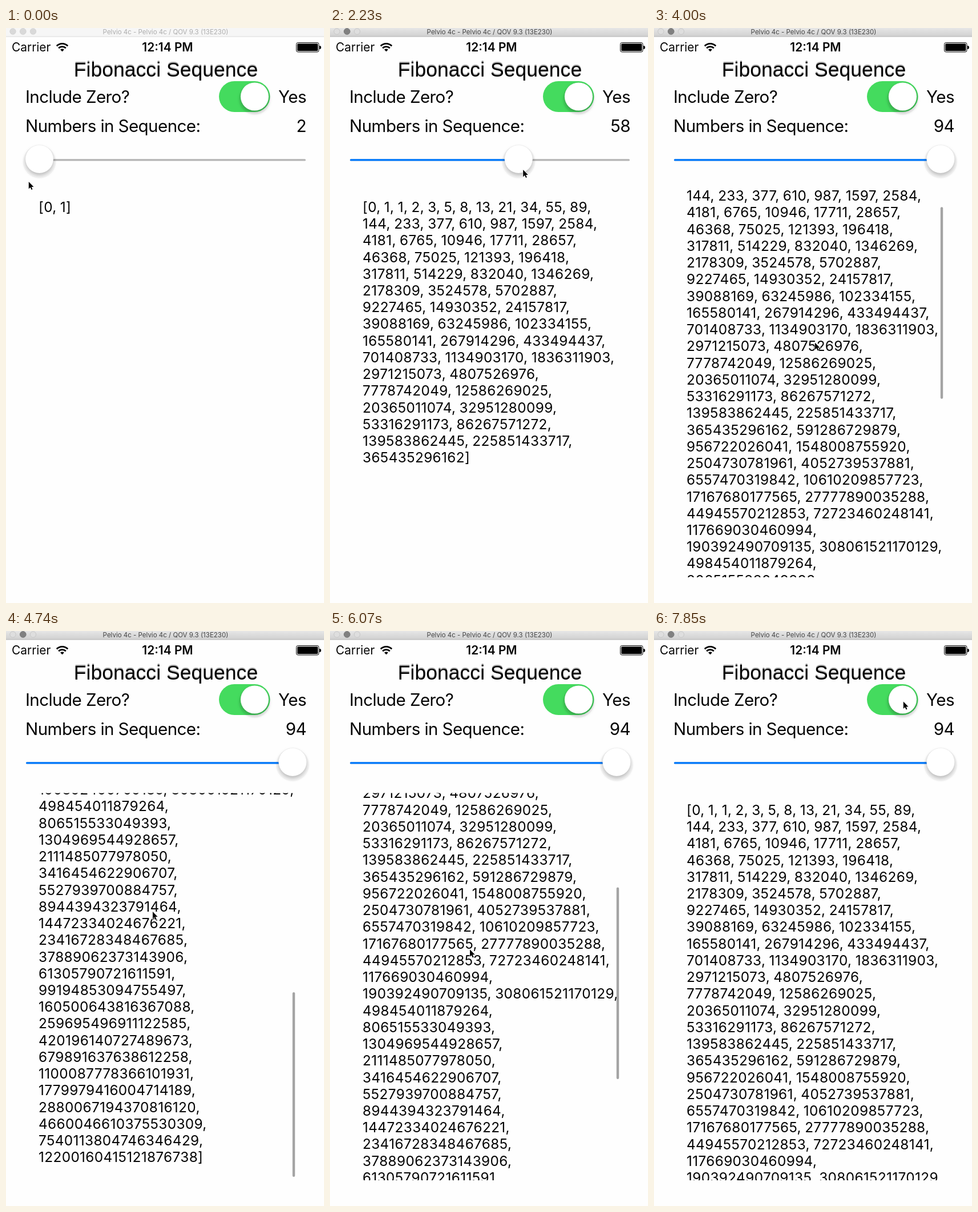
Write an HTML page that moves like this. It is 557 px wide and 1006 px high and loops after 7990 ms.

```html
<!DOCTYPE html>
<html lang="en">
<head>
<meta charset="utf-8">
<title>Fibonacci Sequence</title>
<style>
  html, body { margin: 0; width: 100%; height: 100%; overflow: hidden; background: #fefefe; }
  svg { display: block; width: 100vw; height: 100vh; font-family: Inter, "Open Sans", sans-serif; }
  text { fill: #050505; white-space: pre; }
  .label text { font-size: 29.6px; letter-spacing: -.6px; }
  .title { font: 35.6px "Liberation Sans", Arial, sans-serif; }
  #lines text { font-size: 24.4px; letter-spacing: .33px; word-spacing: -1px; }
  .knob { fill: #fff; stroke: rgba(0,0,0,.07); stroke-width: .8; filter: drop-shadow(0 4px 3px rgba(0,0,0,.22)); }
  .halo { fill: rgba(0,0,0,.035); }
</style>
</head>
<body>
<svg viewBox="0 0 557 1006" preserveAspectRatio="none">
  <defs>
    <linearGradient id="chrome" x2="0" y2="1">
      <stop stop-color="#e6e6e6"/><stop offset="1" stop-color="#d0d0d0"/>
    </linearGradient>
    <clipPath id="view"><rect x="40" y="283.5" width="480" height="677.5"/></clipPath>
  </defs>
  <rect width="557" height="1006" fill="#fefefe"/>

  <rect id="bar" width="557" height="15"/>
  <rect id="barEdge" y="14.5" width="557" height="1"/>
  <g id="buttons" stroke-width=".8">
    <circle cx="12" cy="6" r="5.2"/><circle cx="29.8" cy="6" r="5.4"/><circle cx="47.5" cy="6" r="5.2"/>
  </g>
  <text id="barText" x="279.5" y="10.5" font-size="11.5" text-anchor="middle">Pelvio 4c - Pelvio 4c / QOV 9.3 (13E230)</text>

  <g font-size="20.9">
    <text x="10" y="41">Carrier</text>
    <text x="283" y="41" font-weight="600" text-anchor="middle">12:14 PM</text>
  </g>
  <g fill="none" stroke="#050505" stroke-width="2.9">
    <path d="M88.8 31.4a13.6 13.6 0 0 1 19.4 0M92.2 35.3a8.8 8.8 0 0 1 12.6 0"/>
    <path d="M98.5 41.3l-3.4-3.5a4.8 4.8 0 0 1 6.8 0z" fill="#050505" stroke="none"/>
  </g>
  <rect x="508.5" y="25.5" width="39.5" height="16.5" rx="3" fill="none" stroke="#050505"/>
  <rect x="510.2" y="27.2" width="36.1" height="13.1" rx="1.5"/>
  <path d="M549 31a3 3 0 0 1 0 6z"/>

  <text class="title" x="280" y="83.3" text-anchor="middle" style="fill:#aaa">Fibonacci Sequence</text>
  <text class="title" x="280" y="85" text-anchor="middle">Fibonacci Sequence</text>

  <g class="label">
    <text x="34" y="130.5">Include Zero?</text>
    <text x="526" y="130.5" text-anchor="end">Yes</text>
    <text x="34" y="181.5">Numbers in Sequence:</text>
    <text id="count" x="526" y="181.5" text-anchor="end"></text>
  </g>

  <rect x="373" y="93" width="89.5" height="54" rx="27" fill="#44db5e"/>
  <circle class="halo" cx="435.5" cy="124" r="28"/>
  <circle class="knob" cx="435.5" cy="120" r="24.6"/>

  <rect x="35" y="229.2" width="490" height="3.4" rx="1.7" fill="#b4b4b4"/>
  <rect id="fill" x="35" y="229.2" height="3.4" rx="1.7" fill="#007aff"/>
  <g id="thumb">
    <circle class="halo" cy="234" r="29"/>
    <circle class="knob" cy="229.3" r="24.6"/>
  </g>

  <g clip-path="url(#view)"><g id="lines"></g></g>
  <rect id="indicator" x="501.8" width="4.4" rx="2.2" fill="#a4a4a4"/>
  <path id="cursor" d="M.8 1v12.4l2.8-2.6 2 4.3 1.9-.8-1.9-4.3h3.9z" stroke="#fff" stroke-width="1.4" paint-order="stroke"/>
</svg>
<script>
const LOOP = 7990, STEP = 148;
const LINE = 29.24, ROWS = 45, WRAP = 451;
const MAX_COUNT = 94, MAX_SCROLL = 666.5;
const BAR = { top: 289, bottom: 955, height: 335.5 };

// Stops of the pointer: [time, x, y]
const STOPS = [[0, 39, 268], [600, 65, 247], [3270, 514, 247], [3850, 285, 600], [4150, 277, 496],
  [4740, 256, 490], [5490, 237, 434], [6520, 250, 652], [6960, 459, 227], [7550, 436, 122.5]];

const $ = id => document.getElementById(id);
const set = (id, attrs) => {
  for (const k in attrs) $(id).setAttribute(k, attrs[k]);
};
const clamp = (v, lo, hi) => Math.max(lo, Math.min(hi, v));
const ramp = (t, a, b) => clamp((t - a) / (b - a), 0, 1);
const smooth = (t, a, b) => {
  const f = ramp(t, a, b);
  return f * f * (3 - 2 * f);
};

const slideAt = t => ramp(t, 600, 3243);

// Flick to the end, bounce back, flick to the start, bounce back.
const scrollAt = t =>
  679 * smooth(t, 3850, 4740) - 12.5 * smooth(t, 4740, 5200) -
  672 * smooth(t, 5600, 6520) + 5.5 * smooth(t, 6520, 6900);

const indicatorAt = t =>
  ramp(t, 3800, 3900) - ramp(t, 5100, 5400) + ramp(t, 5650, 5750) - ramp(t, 6720, 6960);

function cursorAt(t) {
  let [, x, y] = STOPS[0];
  for (let i = 1; i < STOPS.length; i++) {
    const f = ramp(t, STOPS[i - 1][0], STOPS[i][0]);
    x += (STOPS[i][1] - STOPS[i - 1][1]) * f;
    y += (STOPS[i][2] - STOPS[i - 1][2]) * f;
  }
  return [x, y];
}

const fib = [0n, 1n];
while (fib.length < MAX_COUNT) fib.push(fib.at(-1) + fib.at(-2));

const rows = Array.from({ length: ROWS }, (_, i) => {
  const row = document.createElementNS("http://www.w3.org/2000/svg", "text");
  row.setAttribute("x", 57);
  row.setAttribute("y", 321.8 + i * LINE);
  return $("lines").appendChild(row);
});

let shown = 0;
function showNumbers(n) {
  if (n === shown) return;
  shown = n;
  $("count").textContent = n;
  const words = `[${fib.slice(0, n).join(", ")}]`.split(" ");
  for (const row of rows) {
    let line = "";
    while (words.length) {
      const longer = line ? line + " " + words[0] : words[0];
      row.textContent = longer;
      if (line && row.getComputedTextLength() > WRAP) break;
      line = longer;
      words.shift();
    }
    row.textContent = line;
  }
}

function showWindow(active) {
  set("bar", { fill: active ? "url(#chrome)" : "#f6f6f6" });
  set("barEdge", { fill: active ? "#b4b4b4" : "#dcdcdc" });
  $("barText").style.fill = active ? "#444" : "#adadad";
  [...$("buttons").children].forEach((dot, i) => {
    const solid = active && i === 1;
    dot.setAttribute("fill", solid ? "#808080" : active ? "#dedede" : "#d9d9d9");
    dot.setAttribute("stroke", solid ? "#747474" : active ? "#c2c2c2" : "#d0d0d0");
  });
}

function showScroll(y, opacity) {
  set("lines", { transform: `translate(0 ${-y})` });
  const inside = clamp(y, 0, MAX_SCROLL);
  const height = BAR.height - Math.abs(y - inside);
  const room = BAR.bottom - BAR.top - height;
  set("indicator", { y: BAR.top + room * inside / MAX_SCROLL, height, opacity });
}

function draw(ms) {
  // The picture is refreshed about seven times a second.
  const t = Math.floor((ms + 10) / STEP) * STEP;
  showWindow(t >= 590);

  const p = slideAt(t), x = 58.5 + 443.5 * p;
  showNumbers(Math.floor(2 + (MAX_COUNT - 2) * p));
  set("thumb", { transform: `translate(${x} 0)` });
  set("fill", { width: x - 35 });

  showScroll(scrollAt(t), indicatorAt(t));
  set("cursor", { transform: `translate(${cursorAt(t)})` });
}

const start = performance.now();
function tick() {
  draw((performance.now() - start) % LOOP);
  requestAnimationFrame(tick);
}
tick();
</script>
</body>
</html>
```
